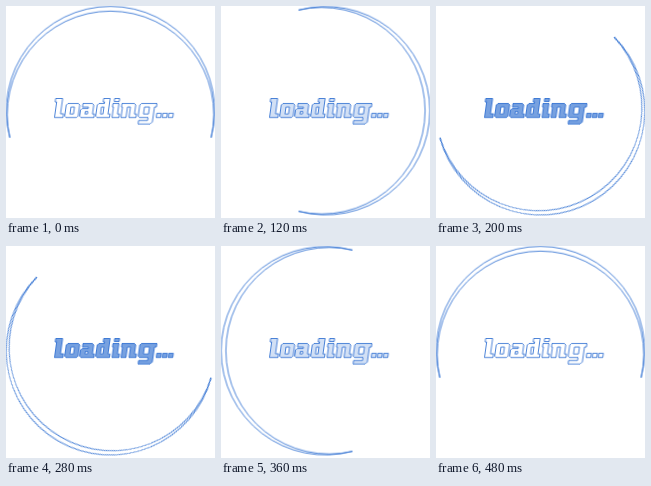
These frames come from a looping animation (209x212 px, 0.52 s). An HTML page:

```html
<!DOCTYPE html>
<html lang="en">
<head>
<meta charset="utf-8">
<title>loading...</title>
<style>
  html, body { margin: 0; width: 100%; height: 100%; overflow: hidden; background: #fff; }
  svg { display: block; width: 209px; height: 212px; }
  .ring, .word { stroke: #2166cf; stroke-width: .8; }
  .ring { fill: #fff; animation: spin 520ms infinite; }
  .word { fill: #4a82d6; stroke-linejoin: round; fill-rule: evenodd; animation: glow 520ms infinite; }

  /* 40 ms ticks: twelve 30 degree turns, then one tick of rest */
  @keyframes spin {
    0% { transform: rotate(0deg); animation-timing-function: steps(12, end); }
    92.3%, 100% { transform: rotate(360deg); }
  }
  @keyframes glow {
    0% { fill-opacity: 0; animation-timing-function: step-end; }
    15.38% { fill-opacity: 0; animation-timing-function: steps(4, end); }
    46.15% { fill-opacity: 1; animation-timing-function: steps(4, end); }
    76.92%, 100% { fill-opacity: 0; }
  }
</style>
</head>
<body>
<svg viewBox="0 0 209 212" role="img" aria-label="loading...">
  <g transform="translate(104.5 104.7)">
    <path class="ring" d="M-100.6 27A104.2 104.2 0 1 1 100.6 27A103.27 103.27 0 1 0 -100.6 27Z"/>
  </g>
  <!-- slanted slab lettering, sheared about the baseline -->
  <g class="word" transform="translate(0 111.5) skewX(-8) translate(0 -111.5)">
    <path d="M47 92.5H54V107.8H57V111.5H48.5V96H47Z"/>
    <path d="M60 97.5H70.5L72 99V110L70.5 111.5H60L58.5 110V99ZM63.5 101V108H67V101Z"/>
    <path d="M75 97.5H84.5L86 99V108H88V111.5H75L73.5 110V104L75 102.5H81V101H75ZM78.5 105.5V108H81V105.5Z"/>
    <path d="M91 97.5H96.5V96H95V92.5H101.5V108H103.5V111.5H91L89.5 110V99ZM94 101V108H96.5V101Z"/>
    <path d="M106 92.5H111V95.5H106ZM105 97.5H111V108H113V111.5H106V101H105Z"/>
    <path d="M114 97.5H126.5L128 99V108H130V111.5H123V101H120V111.5H115V101H114Z"/>
    <path d="M133.5 97.5H149V101H147V116L145 118H133V114.5H142V111.5H133.5L132 110V99ZM137 101V108H142V101Z"/>
    <path d="M150.2 107.3h4.6v4.2h-4.6zM156.2 107.3h4.6v4.2h-4.6zM162.2 107.3h4.6v4.2h-4.6z"/>
  </g>
</svg>
</body>
</html>
```
